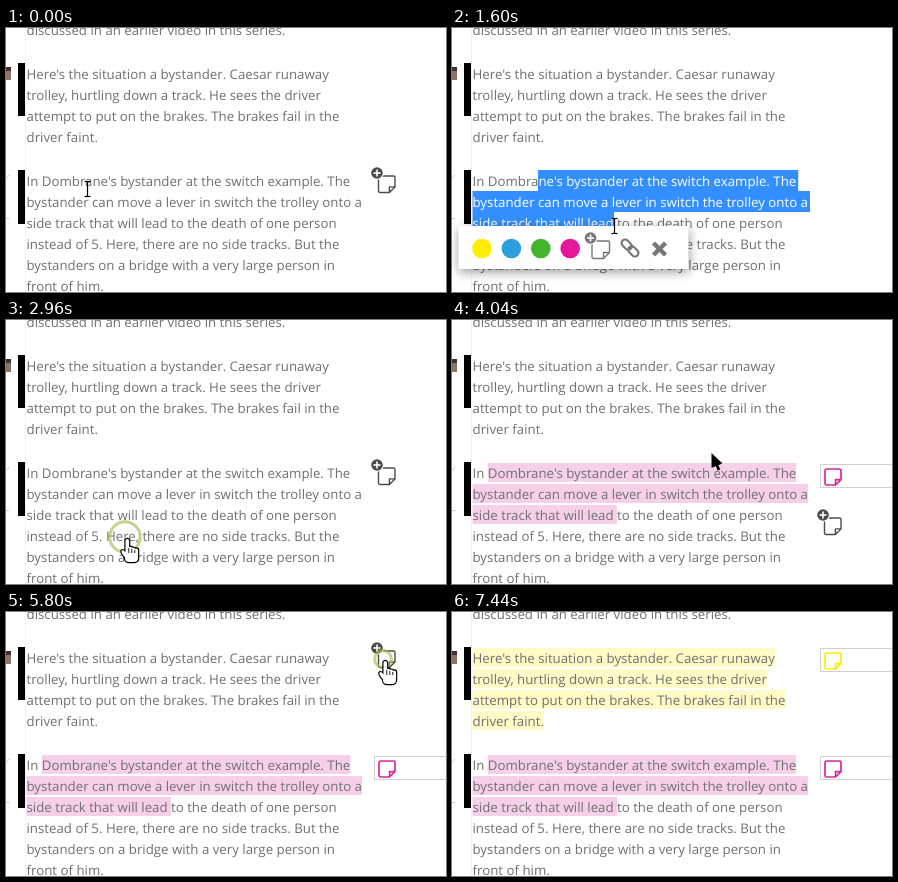
Recreate the animation shown at these times as an HTML page with a canvas. Size 440 by 264 pixels, loop 7.56 s.

```html
<!DOCTYPE html>
<html lang="en">
<head>
<meta charset="utf-8">
<title>Highlighting a transcript</title>
<style>
  html, body { margin: 0; width: 100%; height: 100%; overflow: hidden; background: #fff; }
  canvas { display: block; }
</style>
</head>
<body>
<canvas id="stage" width="440" height="264"></canvas>
<script>
const ctx = document.getElementById('stage').getContext('2d');
const LOOP = 7560, STEP = 40;
const LEFT = 20.5, LINE = 21;
const YELLOW = '#ffee00', PINK = '#d62996', DARK = '#4c4c4c', GREY = '#777', TEXT = '#707070';
const PALE = 0.22, STRONG = 0.75;

const first = {
  top: 36, lines: [
    "Here's the situation a bystander. Caesar runaway",
    'trolley, hurtling down a track. He sees the driver',
    'attempt to put on the brakes. The brakes fail in the',
    'driver faint.']
};
const second = {
  top: 143, lines: [
    "In Dombrane's bystander at the switch example. The",
    'bystander can move a lever in switch the trolley onto a',
    'side track that will lead to the death of one person',
    'instead of 5. Here, there are no side tracks. But the',
    'bystanders on a bridge with a very large person in',
    'front of him.']
};
const marked = { top: second.top, lines: [...second.lines.slice(0, 2), 'side track that will lead '] };

const spot = {
  rest: { x: 81, y: 161 }, word: { x: 86, y: 155 }, dragEnd: { x: 162, y: 198 },
  pinkButton: { x: 119, y: 217 }, gap: { x: 259, y: 133 }, addButton: { x: 377, y: 47 },
  nextText: { x: 316, y: 141 }, offstage: { x: 262, y: 275 }
};
const moves = [
  { from: 0, until: 320, to: spot.word },
  { from: 480, until: 1000, to: spot.dragEnd },
  { from: 1760, until: 2480, to: spot.pinkButton },
  { from: 3400, until: 4040, to: spot.gap },
  { from: 4040, until: 5640, to: spot.addButton },
  { from: 6160, until: 6600, to: spot.nextText },
  { from: 6600, until: 6800, to: spot.offstage }
];
const time = {
  dragStart: 480, dragEnd: 1000, popupShow: 1600, popupHide: 2880,
  pinkClick: 2720, pinkMade: 3160, pinkLeft: 4000, iconUp: 4160,
  yellowClick: 5720, yellowMade: 6160, yellowLeft: 6640, fadeStart: 6920, fadeEnd: 7160
};

const progress = (t, from, until) => Math.max(0, Math.min(1, (t - from) / (until - from)));
const mix = (a, b, p) => a + (b - a) * p;
const textWidth = s => ctx.measureText(s).width;

function pointerAt(t) {
  return moves.reduce(({ x, y }, { from, until, to }) => {
    const p = progress(t, from, until);
    return { x: mix(x, to.x, p), y: mix(y, to.y, p) };
  }, spot.rest);
}

function rect(color, x, y, w, h) {
  ctx.fillStyle = color;
  ctx.fillRect(x, y, w, h);
}

function disc(color, x, y, r) {
  ctx.fillStyle = color;
  ctx.beginPath();
  ctx.arc(x, y, r, 0, 7);
  ctx.fill();
}

function line(color, width, x1, y1, x2, y2) {
  ctx.strokeStyle = color;
  ctx.lineWidth = width;
  ctx.beginPath();
  ctx.moveTo(x1, y1);
  ctx.lineTo(x2, y2);
  ctx.stroke();
}

function placed(x, y, angle, drawShape) {
  ctx.save();
  ctx.translate(x, y);
  ctx.rotate(angle);
  drawShape();
  ctx.restore();
}

function cross(color, width, x, y, reach, angle = 0) {
  placed(x, y, angle, () => {
    line(color, width, -reach, 0, reach, 0);
    line(color, width, 0, -reach, 0, reach);
  });
}

function drawLines({ top, lines }, color) {
  ctx.fillStyle = color;
  lines.forEach((s, i) => ctx.fillText(s, LEFT, top + 15 + i * LINE));
}

function highlight(color, alpha, { top, lines }, skipped = '') {
  ctx.globalAlpha = alpha;
  lines.forEach((s, i) => {
    const indent = i ? 0 : textWidth(skipped);
    rect(color, LEFT + indent, top + i * LINE, textWidth(s) - indent, 19);
  });
  ctx.globalAlpha = 1;
}

function drawSelection(t) {
  const pointer = pointerAt(Math.min(t, time.dragEnd));
  const last = Math.max(0, Math.floor((pointer.y - second.top) / LINE));
  const area = new Path2D();
  for (let i = 0; i <= last; i++) {
    const start = LEFT + (i ? 0 : textWidth('In Dombra') - 0.5);
    const end = i === last ? pointer.x : LEFT + textWidth(second.lines[i]) + 2;
    area.rect(start, second.top - 1 + i * LINE, Math.max(0, end - start), LINE);
  }
  ctx.save();
  ctx.fillStyle = '#338fff';
  ctx.fill(area);
  ctx.clip(area);
  drawLines(second, '#fff');
  ctx.restore();
}

// A square sheet whose lower right corner is folded over
function noteIcon(color, x, y, size, width) {
  placed(x, y, 0, () => {
    const fold = size * 0.66;
    ctx.strokeStyle = color;
    ctx.lineWidth = width;
    ctx.lineJoin = 'round';
    ctx.beginPath();
    ctx.moveTo(fold, size);
    ctx.arcTo(0, size, 0, 0, 1.5);
    ctx.arcTo(0, 0, size, 0, 1.5);
    ctx.arcTo(size, 0, size, fold, 1.5);
    ctx.lineTo(size, fold);
    ctx.lineTo(fold, size);
    ctx.lineTo(fold, fold);
    ctx.lineTo(size, fold);
    ctx.stroke();
  });
}

function addIcon(color, x, y, size) {
  noteIcon(color, x + 1.5, y + 3, size, 1.4);
  disc('#fff', x, y, 6.8);
  disc(color, x, y, 5.8);
  cross('#fff', 1.6, x, y, 3.5);
}

function noteBox(color, y) {
  rect('#fff', 368, y, 73, 24);
  ctx.strokeStyle = '#d0d0d0';
  ctx.lineWidth = 1;
  ctx.strokeRect(368.5, y + 0.5, 73, 23);
  noteIcon(color, 373, y + 5, 16, 1.7);
}

function drawPopup() {
  ctx.save();
  ctx.shadowColor = 'rgba(0,0,0,.4)';
  ctx.shadowBlur = 10;
  ctx.shadowOffsetY = 3;
  rect('#fff', 6.5, 198, 230, 43);
  ctx.restore();
  [YELLOW, '#2a9fdc', '#43b52c', '#e5189a'].forEach((c, i) => disc(c, 30 + i * 29.4, 220.5, 9.8));
  addIcon(GREY, 138.5, 210, 17.5);
  placed(178, 220, Math.PI / 4, () => {
    ctx.strokeStyle = GREY;
    ctx.lineWidth = 2.2;
    for (const x of [-10.5, -1]) {
      ctx.beginPath();
      ctx.roundRect(x, -3.5, 11.5, 7, 3.5);
      ctx.stroke();
    }
  });
  cross(GREY, 4.5, 207.5, 221, 8.5, Math.PI / 4);
}

function outlined(path, fill, outline, width) {
  ctx.lineJoin = 'round';
  ctx.strokeStyle = outline;
  ctx.lineWidth = width;
  ctx.stroke(path);
  ctx.fillStyle = fill;
  ctx.fill(path);
}

function arrow() {
  outlined(new Path2D('M0 0V15L11 10.5Z'), '#000', '#fff', 1.2);
  line('#000', 2.8, 4, 9, 7.5, 17);
}

function hand() {
  const path = new Path2D();
  path.roundRect(0, 2, 3.6, 18, 1.8);
  for (let i = 1; i <= 3; i++) path.roundRect(i * 3, 9 + i * 0.8, 3.6, 9, 1.8);
  path.roundRect(-0.5, 14, 13, 11, 4);
  path.ellipse(-1, 17, 1.8, 4.5, -0.6, 0, 7);
  outlined(path, '#fff', '#000', 2.4);
  for (let i = 1; i <= 3; i++) line('#000', 0.9, i * 3 + 0.3, 10 + i, i * 3 + 0.3, 16);
}

function beam() {
  line('#000', 1.2, 0, -7, 0, 7);
  for (const y of [-7.5, 7.5]) line('#000', 1.2, -3, y, 3, y);
}

function drawPointer(t) {
  const { x, y } = pointerAt(t);
  const overPopup = t > 1800 && t < 3400 && y > 199;
  const overIcon = x > 364 && y < 60;
  const overText = x < 358 && (y > 144 || (y > 36 && y < 120 && x < 334));
  placed(Math.round(x) + 0.5, Math.round(y), 0, overPopup || overIcon ? hand : overText ? beam : arrow);
}

function clickRing(t, start, { x, y }) {
  const p = (t - start) / 280;
  if (p < 0 || p > 1) return;
  ctx.strokeStyle = 'rgba(160,190,80,.65)';
  ctx.lineWidth = 3;
  ctx.beginPath();
  ctx.arc(x, y, 5 + 12 * p, 0, 7);
  ctx.stroke();
}

function drawPage() {
  rect('#fff', 0, 0, 440, 264);
  rect('#f2f2f2', 19, 0, 1, 264);
  rect('#8d7468', 0, 39, 5, 13);
  rect('#3d302d', 0, 39, 5, 4);
  line('#ccc', 1, 0, 151, 3, 147);
  line('#ccc', 1, 0, 190.5, 3, 190.5);
  rect('#000', 12, 35, 7, 53);
  rect('#000', 12, 142, 7, 54);
}

function drawAddIcon(t, fade) {
  if (t >= time.popupShow && t < time.popupHide) return;
  const y = t < time.pinkMade ? 145 : t < time.iconUp ? 195
    : t < time.yellowMade ? 36 : t < time.yellowLeft ? 87 : 195;
  ctx.globalAlpha = 1 - fade;
  addIcon(DARK, 371, y, 16.5);
  ctx.globalAlpha = 1;
}

function draw(t) {
  ctx.font = '13.28px "Open Sans", sans-serif';
  ctx.textRendering = 'geometricPrecision';
  const fade = progress(t, time.fadeStart, time.fadeEnd);
  const hasPink = t >= time.pinkMade, hasYellow = t >= time.yellowMade;
  drawPage();
  if (hasYellow) highlight(YELLOW, t < time.yellowLeft ? STRONG : PALE, first);
  if (hasPink) {
    const away = t >= time.pinkLeft && t < time.yellowLeft;
    highlight(PINK, away ? PALE : mix(STRONG, PALE, fade), marked, 'In ');
  }
  ctx.fillStyle = TEXT;
  ctx.fillText('discussed in an earlier video in this series.', LEFT, 7);
  drawLines(first, TEXT);
  drawLines(second, TEXT);
  if (t >= time.dragStart && t < time.popupHide) drawSelection(t);
  if (hasPink) noteBox(PINK, 144);
  if (hasYellow) noteBox(YELLOW, 36);
  drawAddIcon(t, fade);
  if (t >= time.popupShow && t < time.popupHide) drawPopup();
  clickRing(t, time.pinkClick, spot.pinkButton);
  clickRing(t, time.yellowClick, spot.addButton);
  drawPointer(t);
}

const start = performance.now();
function tick() {
  const t = (performance.now() - start) % LOOP;
  draw(Math.floor(t / STEP) * STEP);
  requestAnimationFrame(tick);
}
tick();
</script>
</body>
</html>
```
